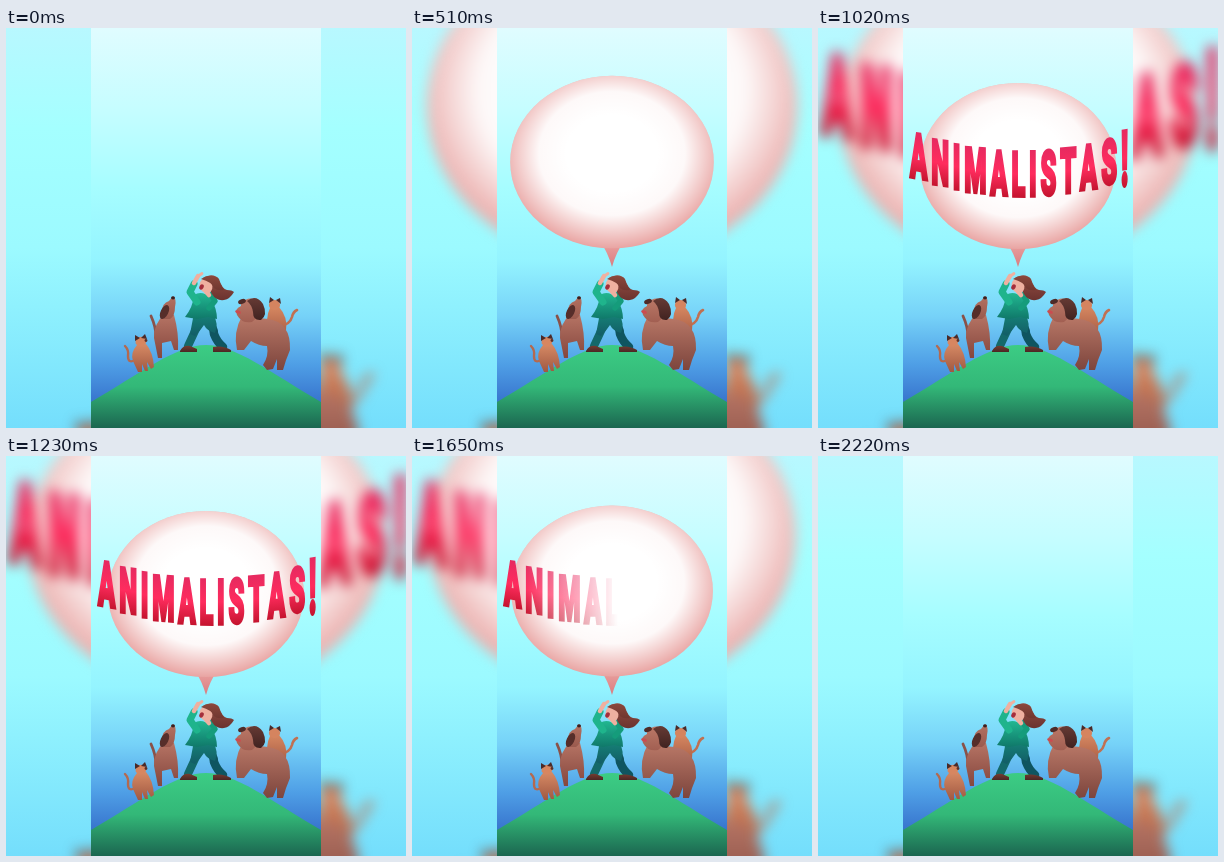
Write an HTML page with a canvas that moves like this. It is 400 px wide and 400 px high and loops after 2250 ms.

```html
<!DOCTYPE html>
<html lang="es">
<head>
<meta charset="utf-8">
<style>
html, body { margin: 0; width: 100%; height: 100%; overflow: hidden; }
canvas { display: block; width: 400px; height: 400px; }
</style>
</head>
<body>
<canvas id="stage" width="400" height="400"></canvas>
<script>
const LOOP = 2250, STEP = 30, ZOOM = 1.82;
const WORD = [...'ANIMALISTAS!'];
const stage = document.getElementById('stage').getContext('2d');

function makeLayer() {
  const canvas = document.createElement('canvas');
  canvas.width = canvas.height = 400;
  return canvas.getContext('2d');
}
const g = makeLayer(), lettering = makeLayer();

const clamp = v => Math.max(0, Math.min(1, v));

function fade(ctx, y0, y1, ...stops) {
  const grad = ctx.createLinearGradient(0, y0, 0, y1);
  stops.forEach(([at, color]) => grad.addColorStop(at, color));
  return grad;
}

function blob(d, light, dark = light, y0 = 0, y1 = 400) {
  g.fillStyle = fade(g, y0, y1, [0, light], [1, dark]);
  g.fill(new Path2D(d));
}

function line(d, width, color) {
  g.lineWidth = width;
  g.strokeStyle = color;
  g.stroke(new Path2D(d));
}

function oval(x, y, rx, ry, color, turn = 0) {
  g.fillStyle = color;
  g.beginPath();
  g.ellipse(x, y, rx, ry, turn, 0, 7);
  g.fill();
}

function hill() {
  g.fillStyle = fade(g, 317, 400, [0, '#3ccc84'], [.5, '#33b878'], [1, '#1b6650']);
  g.fill(new Path2D('M85 374 C135 345 170 317 200 317 S265 345 315 374 V400 H85 Z'));
}

function leftCat() {
  line('M129 332 Q122 336 122 328 Q123 322 119 318', 2.4, '#b4694f');
  blob('M131 317 Q124 325 127 333 L132 344 H136 L136 336 L139 343 H142 L141 334 L145 341 L148 339 Q147 324 140 316 Z',
    '#dd9068', '#a05842', 313, 344);
  oval(135, 313.5, 5.5, 4.6, '#d78660', -.3);
  blob('M129 313 L129 307 L134 310 Z M135 310 L139 306 L141 311 Z', '#4b2a28');
  oval(140, 312.5, 1.4, 1.4, '#5b3028');
}

function leftDog() {
  line('M150 309 Q150 299 145 288', 2.8, '#8a5249');
  blob('M159 285 Q147 297 148 310 L152 330 H156 L156 315 L165 313 L168 322 H172 Q173 305 168 287 Z',
    '#b87666', '#87483f', 285, 328);
  blob('M156 284 Q156 275 163 273 L167 268 Q171 271 169 279 Q169 288 164 291 H158 Z', '#b27060', '#97584c', 270, 293);
  oval(158.5, 284, 3.8, 7.5, '#562e2a', .45);
  oval(167, 269.8, 2, 1.6, '#3c2020');
}

function rightCat() {
  line('M275 298 Q284 296 286 289 Q287 284 291 282', 2.6, '#c07052');
  blob('M264 280 Q259 290 263 302 H280 Q282 289 273 279 Z', '#dc8d64', '#b0644a', 275, 302);
  oval(268.5, 277, 5.6, 5, '#d5845f');
  blob('M263 275 L264 269 L268 272 Z M270 272 L274 270 L275 276 Z', '#4b2a28');
}

function rightDog() {
  blob('M236 288 Q227 304 231 322 L238 322 L245 313 Q253 318 261 318 Q263 328 257 337 L261 342 L267 341 ' +
    'L271 331 L271 342 L277 342 Q280 331 284 322 Q285 294 262 291 Z',
    '#b97867', '#7d453d', 288, 342);
  blob('M235 275 Q243 267 252 273 Q256 286 246 294 Q236 296 231 287 Q228 281 235 278 Z', '#bb7968', '#a05d50', 270, 296);
  blob('M241 273 Q250 266 257 276 Q262 287 255 292 Q247 293 247 284 Q246 277 241 273 Z', '#663a34', '#3f2220', 270, 293);
  oval(236, 273.5, 4, 2.4, '#4e2b28', -.3);
  oval(232, 284, 3, 1.6, '#cc4b50', .3);
}

function shouter() {
  const skin = '#efb0a0';
  // legs and shoes
  line('M194 292 Q189 303 182 318', 8, '#14696a');
  line('M201 292 Q208 299 208 306 Q211 314 217 319', 8.5, '#0f5560');
  blob('M188 285 H207 Q213 296 209 305 Q201 303 198 297 Q194 303 189 308 L184 306 Z', '#168578', '#125c66', 284, 308);
  blob('M174 323 Q177 317 184 318 L191 321 V324 H174 Z M207 324 V319 Q217 317 225 322 V324 Z', '#7a3f32', '#4b2624', 317, 324);
  // jacket and arms
  blob('M188 267 Q196 262 205 270 Q211 281 211 291 L202 289 L191 291 L179 289 Q187 279 188 267 Z',
    '#22ba92', '#0f7668', 264, 292);
  line('M191 274 L184 264 L188 256', 7, '#1fb48c');
  line('M203 280 L209 273 L205 267', 5.5, '#159c7b');
  // head, hair and hands
  blob('M197 250 Q207 244 213 251 Q216 261 221 262 Q226 262 228 264 Q224 271 218 272 Q210 273 206 266 Z',
    '#985044', '#6b332f', 246, 272);
  oval(200, 258, 6.2, 7.4, skin, -.45);
  blob('M195 251 Q203 245 212 250 Q214 256 218 262 Q211 263 208 260 Q206 254 195 251 Z', '#8e493d', '#6d352f', 246, 264);
  oval(195.5, 259, 2.1, 2.8, '#a52e3c', .5);
  line('M188 255 L192 248', 4.5, skin);
  line('M191 249 L196 245.5', 2.8, skin);
  line('M203 267 L200 263.5', 4.5, skin);
}

// Pops out of the mouth: back ease with a slight overshoot, anchored at the tip.
function bubble(t) {
  const clock = Math.min(t, LOOP - t);
  const rest = 1 - clamp((clock - 254) / 440);
  const size = 1 - 2.1 * rest ** 3 + 1.1 * rest ** 2;
  if (size <= 0) return;
  g.save();
  g.translate(200, 239);
  g.scale(size, size);
  blob('M-11 -24 Q-4 -14 0 0 Q4 -14 11 -24 Z', '#eaa3a1', '#d97c80', -24, 0);
  oval(0, -101, 98, 83, '#e8a09e');
  g.translate(0, -101);
  g.scale(98, 83);
  const glow = g.createRadialGradient(0, -.1, .45, 0, -.1, 1.12);
  glow.addColorStop(0, '#fff');
  glow.addColorStop(.4, '#ffffffee');
  glow.addColorStop(1, '#fff0');
  g.globalAlpha = clamp(size * 1.3 - .15);
  g.beginPath();
  g.arc(0, 0, 1, 0, 7);
  g.fillStyle = glow;
  g.fill();
  g.restore();
}

// Condensed capitals on a sagging arc.
function drawWord(ctx) {
  const squeeze = .41, gap = 3.8;
  ctx.font = '900 62px Roboto, sans-serif';
  ctx.textAlign = 'center';
  ctx.lineJoin = 'miter';
  ctx.miterLimit = 2;
  ctx.lineWidth = 3.6;
  ctx.fillStyle = ctx.strokeStyle = fade(ctx, -46, 2, [0, '#e62a60'], [.5, '#ff2c5e'], [1, '#c4142e']);
  const widths = WORD.map(c => ctx.measureText(c).width * squeeze);
  let x = 201 - (widths.reduce((a, b) => a + b) + gap * (WORD.length - 1)) / 2;
  WORD.forEach((char, i) => {
    const mid = x + widths[i] / 2, u = (mid - 205) / 105;
    x += widths[i] + gap;
    ctx.save();
    ctx.transform(1, -.18 * u, 0, 1, mid, 168 - 18 * u * u);
    if (char === '!') ctx.transform(1, 0, 0, 1.22, 0, 6);
    ctx.scale(squeeze, 1);
    ctx.strokeText(char, 0, 0);
    ctx.fillText(char, 0, 0);
    ctx.restore();
  });
}

// A soft edge wipes the word in from the left, and back out again.
function word(t) {
  const feather = 95, shown = clamp(Math.min(t - 510, 1810 - t) / 435);
  if (!shown) return;
  const edge = 90 + (220 + feather) * shown;
  lettering.clearRect(0, 0, 400, 400);
  lettering.save();
  drawWord(lettering);
  const mask = lettering.createLinearGradient(edge - feather, 0, edge, 0);
  mask.addColorStop(0, '#000');
  mask.addColorStop(1, '#0000');
  lettering.globalCompositeOperation = 'destination-in';
  lettering.fillStyle = mask;
  lettering.fillRect(0, 0, 400, 400);
  lettering.restore();
  g.drawImage(lettering.canvas, 0, 0);
}

function compose() {
  stage.fillStyle = fade(stage, 0, 400, [0, '#b8f8ff'], [.25, '#a4ffff'], [.55, '#9cfaff'], [1, '#74defc']);
  stage.fillRect(0, 0, 400, 400);
  stage.save();
  stage.filter = 'blur(6.5px)';
  const side = 400 * ZOOM;
  stage.drawImage(g.canvas, 200 - side / 2, 198 - side / 2, side, side);
  stage.restore();

  stage.fillStyle = fade(stage, 0, 400, [0, '#e0fcff'], [.2, '#c6fdff'], [.4, '#a6fdff'],
    [.58, '#94f4ff'], [.72, '#76d2f8'], [.84, '#4f9fe6'], [.94, '#3672cc'], [1, '#3060c0']);
  stage.fillRect(85, 0, 230, 400);
  stage.drawImage(g.canvas, 85, 0, 230, 400, 85, 0, 230, 400);
}

function draw(now) {
  const t = Math.floor(now % LOOP / STEP) * STEP;
  g.clearRect(0, 0, 400, 400);
  g.lineCap = g.lineJoin = 'round';
  hill();
  leftCat();
  leftDog();
  rightCat();
  rightDog();
  shouter();
  bubble(t);
  word(t);
  compose();
  requestAnimationFrame(draw);
}
requestAnimationFrame(draw);
</script>
</body>
</html>
```
